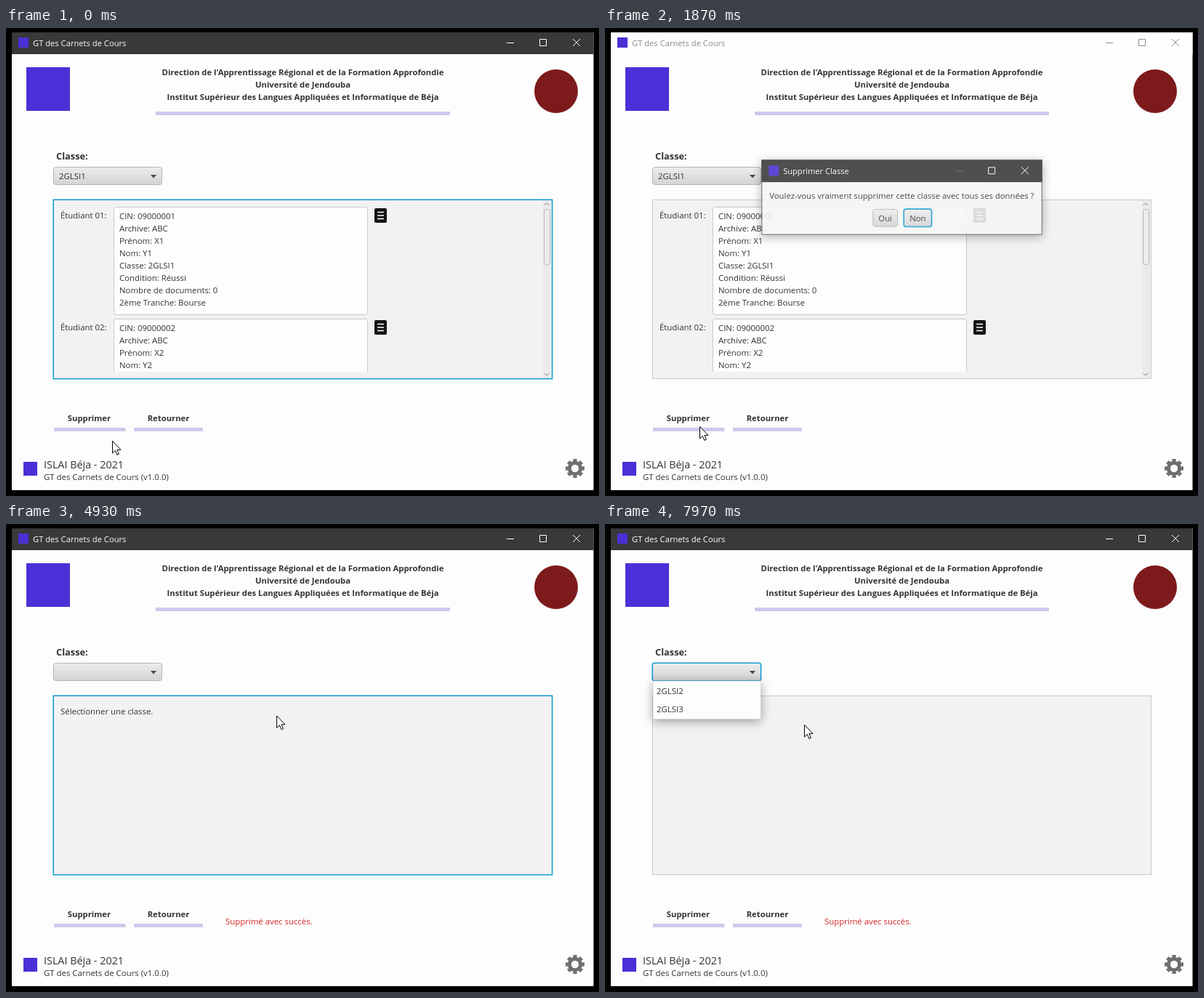
Recreate the animation shown at these times as an HTML page. Size 816 px wide and 644 px high, loop 8000 ms.

```html
<!DOCTYPE html>
<html lang="fr">
<head>
<meta charset="utf-8">
<title>Carnets</title>
<style>
html, body { margin: 0; width: 100%; height: 100%; overflow: hidden; background: #000; }
svg { display: block; width: 816px; height: 644px; }
text { font: 11.4px "Open Sans", "Noto Sans", sans-serif; fill: #333; white-space: pre; }
.b { font-weight: 700; font-size: 11.28px; }
.mid { text-anchor: middle; }
.bar { fill: #3a383a; }
.onbar { font-size: 11.2px; fill: #fff; }
.ctl { fill: none; stroke: #fff; }
.idle .bar { fill: #fefefe; }
.idle .onbar { fill: #8c8c8c; }
.idle .ctl { stroke: #8c8c8c; }
.rule { fill: #cec9ec; }
.box { fill: #fdfdfd; stroke: #c9c9cf; }
.btn { fill: url(#face); stroke: #b5b5b9; }
.focus { fill: none; stroke: #169fd0; stroke-width: 1.6; }
.logo { fill: #4a30d6; }
#dialog, #popup { filter: drop-shadow(0 3px 7px rgba(0, 0, 0, .35)); }
</style>
</head>
<body>
<svg viewBox="0 0 816 644">
  <defs>
    <linearGradient id="face" x2="0" y2="1">
      <stop stop-color="#ececec"/><stop offset="1" stop-color="#d4d4d6"/>
    </linearGradient>
    <clipPath id="view"><path d="M66 237H738V473H66z"/></clipPath>
    <g id="doc">
      <rect width="17" height="20" rx="2" fill="#141414"/>
      <path d="M4 5.5H13M4 10H13M4 14.5H13" stroke="#fefefe" stroke-width="1.4"/>
    </g>
  </defs>

  <rect x="8" y="6" width="800.5" height="630" fill="#fdfdfd"/>
  <g id="title">
    <rect class="bar" x="8" y="6" width="800.5" height="30"/>
    <rect class="logo" x="17" y="13" width="14" height="14"/>
    <text class="onbar" x="37" y="25">GT des Carnets de Cours</text>
    <path class="ctl" d="M689 20.5H699M734.5 15.5H743.5V24.5H734.5zM780 15L790 25M790 15L780 25"/>
  </g>

  <rect class="logo" x="28" y="54" width="60" height="60"/>
  <circle cx="757" cy="87" r="30" fill="#7d1a1c"/>
  <text class="b mid" x="408.5" y="65">Direction de l'Apprentissage Régional et de la Formation Approfondie</text>
  <text class="b mid" x="408.5" y="82">Université de Jendouba</text>
  <text class="b mid" x="408.5" y="99">Institut Supérieur des Langues Appliquées et Informatique de Béja</text>
  <rect class="rule" x="206" y="115" width="405" height="5"/>

  <text class="b" x="69" y="181" style="font-size:12.8px">Classe:</text>
  <rect class="btn" x="65.5" y="191.5" width="149" height="24" rx="3"/>
  <path d="M199 202H207L203 206.5z" fill="#444"/>
  <text id="chosen" x="73" y="208">2GLSI1</text>
  <rect id="comboFocus" class="focus" x="65.2" y="191.2" width="149.4" height="24.6" rx="3"/>

  <rect x="65.5" y="236.5" width="686" height="246" fill="#f2f2f2" stroke="#c9c9cf"/>
  <g id="list">
    <g id="students" clip-path="url(#view)"></g>
    <rect x="739" y="237" width="11" height="245" fill="#ebebeb"/>
    <rect x="740.5" y="249.5" width="8" height="76" rx="3" fill="#ececec" stroke="#b5b5b9"/>
    <path d="M740.5 244L744 241 747.5 244M740.5 475L744 478 747.5 475" fill="none" stroke="#888"/>
  </g>
  <g id="done">
    <text x="75" y="262">Sélectionner une classe.</text>
    <text x="302" y="551" style="fill:#d42424">Supprimé avec succès.</text>
  </g>
  <rect id="panelFocus" class="focus" x="65.2" y="236.3" width="686.4" height="246.4"/>

  <text class="b mid" x="114.5" y="541">Supprimer</text>
  <text class="b mid" x="223.5" y="541">Retourner</text>
  <rect class="rule" x="66" y="550" width="98.5" height="5"/>
  <rect class="rule" x="176" y="550" width="95" height="5"/>

  <rect class="logo" x="24" y="597" width="19" height="19"/>
  <text x="52" y="606" style="font-size:14.36px">ISLAI Béja - 2021</text>
  <text x="52" y="622">GT des Carnets de Cours (v1.0.0)</text>
  <g fill="none" stroke="#6e6e6e">
    <circle cx="783" cy="606" r="7.7" stroke-width="5"/>
    <circle cx="783" cy="606" r="11" stroke-width="4" pathLength="80" stroke-dasharray="6 4" stroke-dashoffset="3"/>
  </g>

  <g id="popup">
    <rect x="66" y="216" width="148.5" height="52.5" fill="#fdfdfd" stroke="#c9c9cf" stroke-width=".6"/>
    <text x="71" y="234">2GLSI2</text>
    <text x="71" y="259">2GLSI3</text>
  </g>

  <g id="dialog">
    <rect x="214.5" y="181.5" width="388" height="103" fill="#f6f6f6" stroke="#555"/>
    <rect class="bar" x="214" y="181" width="389" height="31"/>
    <rect class="logo" x="224" y="189" width="14" height="14"/>
    <text class="onbar" x="244" y="201">Supprimer Classe</text>
    <path class="ctl" d="M483 196.5H493" opacity=".2"/>
    <path class="ctl" d="M528.5 191.5H537.5V200.5H528.5zM574 191L584 201M584 191L574 201"/>
    <text x="225" y="235">Voulez-vous vraiment supprimer cette classe avec tous ses données ?</text>
    <rect class="btn" x="368.5" y="249.5" width="34" height="24" rx="3"/>
    <rect class="btn" x="411.5" y="249.5" width="38" height="24" rx="3"/>
    <rect class="focus" x="411.2" y="249.2" width="38.6" height="24.6" rx="3"/>
    <text class="mid" x="385.5" y="266">Oui</text>
    <text class="mid" x="430.5" y="266">Non</text>
  </g>

  <circle id="ripple" fill="#e01010"/>
  <path id="cursor" d="M.5 .5V17L4.3 13.4 6.9 19.4 9.4 18.3 6.9 12.4H12z" fill="#fff" stroke="#000"/>
</svg>
<script>
const LOOP = 8000;
const $ = id => document.getElementById(id);
const show = (id, on) => { $(id).style.display = on ? "" : "none"; };
const part = (t, from, to) => Math.min(1, Math.max(0, (t - from) / (to - from)));
const easeOut = p => Math.sin(p * Math.PI / 2);

// Cursor moves: start, end, x, y
const home = [146, 568];
const moves = [
  [550, 1000, 130, 548],
  [2600, 3200, 382, 266],
  [4912, 5570, 163, 210],
  [7250, 7970, 274, 276]
];
const clicks = [1325, 3895, 5865];
const OPEN = 1660, CLOSE = 4040, DROP = 5970;

function cursorAt(t) {
  let [x, y] = home;
  for (const [from, to, x1, y1] of moves) {
    const k = easeOut(part(t, from, to));
    x += (x1 - x) * k;
    y += (y1 - y) * k;
  }
  return [x, y];
}

function student(n, y) {
  const lines = ["CIN: 0900000" + n, "Archive: ABC", "Prénom: X" + n, "Nom: Y" + n, "Classe: 2GLSI1",
    "Condition: Réussi", "Nombre de documents: 0", "2ème Tranche: Bourse"];
  return `<text x="75" y="${y + 16}">Étudiant 0${n}:</text>
    <rect class="box" x="148.5" y="${y + .5}" width="349" height="148" rx="3"/>
    <use href="#doc" x="507" y="${y + 2}"/>` +
    lines.map((s, i) => `<text x="156" y="${y + 17 + i * 17}">${s}</text>`).join("");
}
$("students").innerHTML = student(1, 246) + student(2, 400);

function draw(t) {
  const deleted = t >= CLOSE;
  const idle = t >= OPEN - 40 && !deleted;
  const dropped = t >= DROP;
  $("title").setAttribute("class", idle ? "idle" : "");
  show("chosen", !deleted);
  show("list", !deleted);
  show("done", deleted);
  show("panelFocus", !idle && !dropped);
  show("comboFocus", dropped);
  show("popup", dropped);

  const opening = 1 - (1 - part(t, OPEN, OPEN + 320)) ** 2;
  const closing = part(t, CLOSE, CLOSE + 160);
  const size = 1 - .06 * (1 - opening) - .08 * closing;
  show("dialog", opening > 0 && closing < 1);
  $("dialog").style.opacity = opening * (1 - closing);
  $("dialog").setAttribute("transform", `translate(408.5 233) scale(${size}) translate(-408.5 -233)`);

  const [x, y] = cursorAt(t);
  $("cursor").setAttribute("transform", `translate(${x} ${y})`);

  const click = clicks.find(c => t >= c && t < c + 500);
  show("ripple", click !== undefined);
  if (click !== undefined) {
    const p = (t - click) / 500;
    $("ripple").setAttribute("cx", x);
    $("ripple").setAttribute("cy", y);
    $("ripple").setAttribute("r", 3.2 + 28 * p);
    $("ripple").style.opacity = (1 - p) ** 1.5;
  }
}

function tick() {
  draw(performance.now() % LOOP);
  requestAnimationFrame(tick);
}
tick();
</script>
</body>
</html>
```
